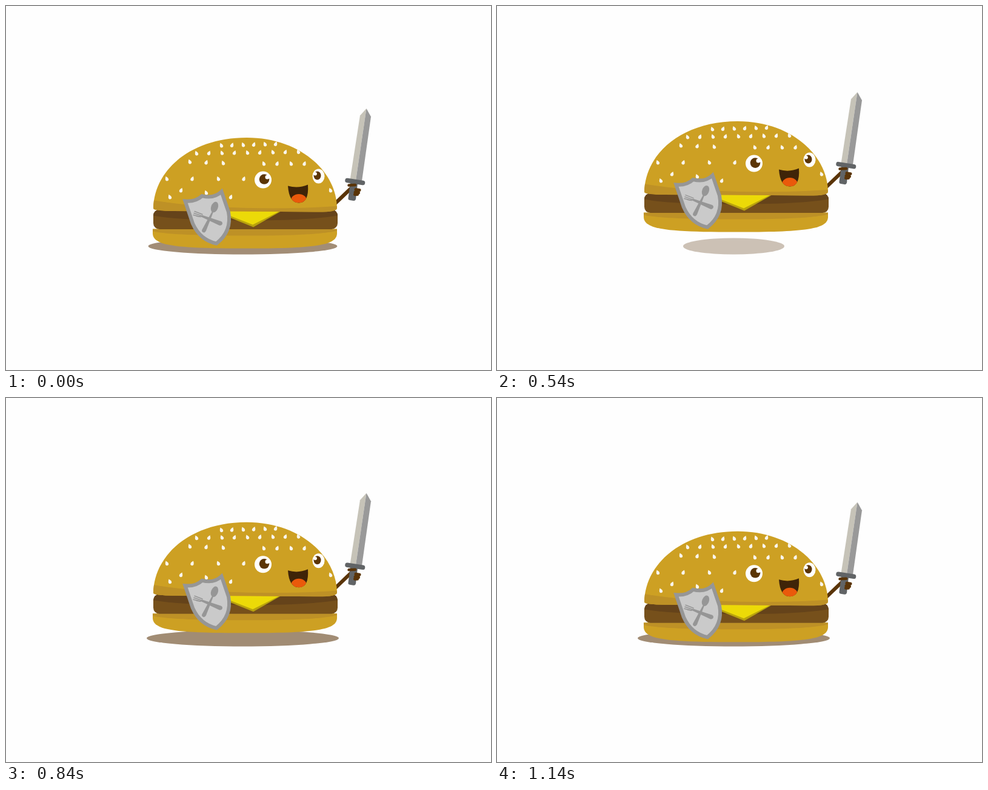
An HTML page for the animation above (1200 ms loop, 800 px wide and 600 px high).

```html
<!DOCTYPE html>
<html lang="en">
<head>
<meta charset="utf-8">
<title>Burger knight</title>
<style>
  html, body { margin: 0; width: 100%; height: 100%; overflow: hidden; background: #fefefe; }
  svg { display: block; width: 800px; height: 600px; }
  .round { fill: none; stroke-linecap: round; }
</style>
</head>
<body>
<svg viewBox="0 0 800 600">
  <defs>
    <clipPath id="mouthClip"><path id="mouth" d="M465 296Q482 301 498 294Q500 324 483 324Q467 324 465 296Z"/></clipPath>
    <clipPath id="pattyClip"><rect id="patty" x="243" y="335" width="304" height="32.500" rx="10"/></clipPath>
    <clipPath id="bunClip"><path id="bun" d="M242 367H546V374C546 394 512 399 394 399C276 399 242 394 242 374Z"/></clipPath>
    <clipPath id="domeClip"><path id="dome" d="M243 333C244 270 305 216.500 397 216.500C485 216.500 545 272 546 332Q547 339 515 339Q400 338 275 337.500Q243 337 243 333Z"/></clipPath>
  </defs>

  <ellipse id="shadow" rx="158.500" ry="13.500" fill="#a18c74"/>

  <g id="hero">
    <path class="round" d="M544 324L568 301" stroke="#5a3407" stroke-width="6"/>

    <g id="sword">
      <path d="M594.500 168.500L584 180L567.500 286L577 287Z" fill="#c6c3b8"/>
      <path d="M594.500 168.500L602 182L587 288L577 287Z" fill="#999"/>
      <path d="M568 290L580 292L577 318Q576 321 573 320.500L567 319.500Q564 319 564.500 316Z" fill="#616466"/>
      <path class="round" d="M563 287L588.500 291" stroke="#616466" stroke-width="7.500"/>
      <g class="round" stroke="#5a3407">
        <path d="M565.500 295L576 294.500" stroke-width="4.500"/>
        <path d="M577 302L583 303M576 306.500L581.500 307.500M575.500 310L579.500 310" stroke-width="5"/>
      </g>
    </g>

    <use href="#bun" fill="#cda023"/>
    <path d="M242 366H546V370Q515 378 394 378Q275 378 242 371Z" fill="#be9126" clip-path="url(#bunClip)"/>
    <use href="#patty" fill="#76501b"/>
    <path d="M243 335H547V345Q500 353 394 353Q285 353 243 345Z" fill="#65431a" clip-path="url(#pattyClip)"/>
    <path d="M366 337H455L408 364L366 347Z" fill="#b9a30d"/>
    <path d="M366 337H453L407 360L366 344Z" fill="#ecda08"/>

    <use href="#dome" fill="#cda023"/>
    <path d="M242 319.500Q300 330 400 332.500Q490 334 548 329V345H242Z" fill="#be9126" clip-path="url(#domeClip)"/>
    <g id="seeds" fill="#f9f5ec"></g>

    <g id="face">
      <circle cx="424" cy="286" r="14" fill="#fff"/>
      <circle cx="426" cy="285" r="8.300" fill="#5b3506"/>
      <circle cx="431" cy="281.500" r="3.500" fill="#fff"/>
      <ellipse cx="515.500" cy="280" rx="10" ry="12" fill="#fff"/>
      <ellipse cx="513.500" cy="279" rx="6" ry="7" fill="#5b3506"/>
      <circle cx="510" cy="276" r="2.900" fill="#fff"/>
      <use href="#mouth" fill="#3f2408"/>
      <ellipse cx="483" cy="320" rx="13" ry="10.500" fill="#ea590b" clip-path="url(#mouthClip)"/>
    </g>

    <g id="shield">
      <path d="M295.500 321Q313 322.500 323.500 312.500Q343 317.500 355.500 305.500L367 339Q373 371 347 391Q320 385 308 358Z"
            fill="#cacaca" stroke="#969696" stroke-width="6"/>
      <g fill="#969696">
        <ellipse cx="344" cy="331" rx="5.700" ry="9" transform="rotate(20 344 331)"/>
        <path d="M340 338L342 339L330 370Q328 374 325 372.500Q322 371 323.500 368Z"/>
        <path d="M323 344L355 354.500Q358 356.500 356.500 359.500Q355 362 351.500 361L322 347Q315 348 312 345L322 346Z"/>
      </g>
      <path class="round" d="M311 338L324 343M310 341L323 345.500M309 344L321 347" stroke="#969696" stroke-width="1.500"/>
    </g>
  </g>
</svg>
<script>
  const find = id => document.getElementById(id);

  // Rows of sesame seeds, tilted alternately
  function seedRow(x, y, dx, dy, count) {
    for (let i = 0; i < count; i++) {
      const tilt = i % 2 ? 22 : -22;
      find("seeds").innerHTML +=
        `<path d="M0-4Q2.700-.5 2.700 1.200A2.700 2.700 0 0 1-2.700 1.200Q-2.700-.5 0-4Z"
          transform="translate(${x + i * dx} ${y + i * dy}) rotate(${tilt})"/>`;
    }
  }
  seedRow(355, 229, 18, -.5, 6);
  seedRow(314, 242, 21, -.3, 9);
  seedRow(303, 256, 27.5, 1, 3);
  seedRow(425, 259, 22.5, 0, 4);
  seedRow(265, 284, 42.5, 0, 4);
  seedRow(270, 314, 19, -11, 2);
  seedRow(330, 307, 41, 7, 2);
  seedRow(535, 303, 0, 0, 1);

  const STEP = 60, LOOP = 1200, CYCLE = 1000, DELAY = 140;

  // One leap and two smaller bounces
  const keys = [
    { at: 0, height: 0, shrink: 0 },
    { at: 200, height: 0, shrink: 0 },
    { at: 400, height: 29.7, shrink: .473 },
    { at: 430, height: 29.7, shrink: .473 },
    { at: 560, height: 0, shrink: 0 },
    { at: 700, height: 15, shrink: 0 },
    { at: 830, height: 0, shrink: 0 },
    { at: 900, height: 3.4, shrink: .02 },
    { at: CYCLE, height: 0, shrink: 0 }
  ];
  const easeOut = x => 1 - (1 - x) ** 3;
  const easeIn = x => x ** 5;

  function pose(time) {
    const next = keys.findIndex(key => key.at > time);
    const a = keys[next - 1], b = keys[next];
    const x = (time - a.at) / (b.at - a.at);
    const k = b.height > a.height ? easeOut(x) : easeIn(x);
    const mix = name => a[name] + (b[name] - a[name]) * k;
    return { height: mix("height"), scale: 1 - mix("shrink") };
  }

  function draw(now) {
    const time = Math.floor(now % LOOP / STEP) * STEP;
    const { height, scale } = pose((time - DELAY + CYCLE) % CYCLE);
    find("hero").setAttribute("transform", `translate(0 ${3.3 - height})`);
    find("shadow").setAttribute("transform", `translate(390.500 396) scale(${scale} 1)`);
    find("shadow").setAttribute("opacity", scale);
  }

  const start = performance.now();
  function tick() {
    draw(performance.now() - start);
    requestAnimationFrame(tick);
  }
  tick();
</script>
</body>
</html>
```
